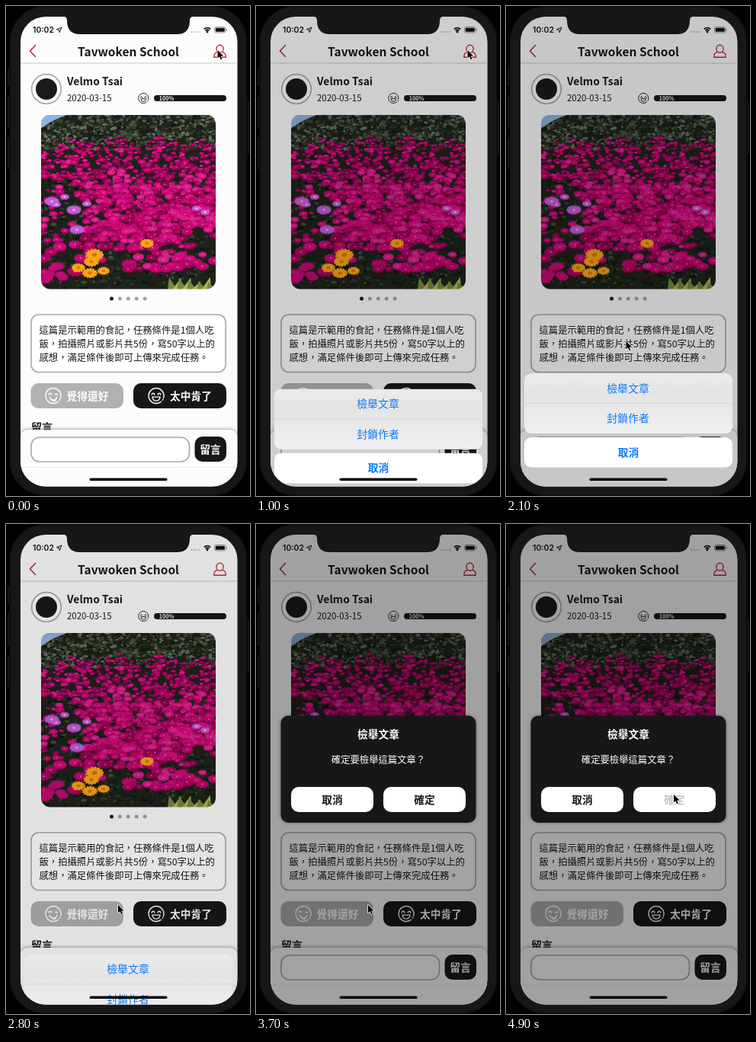
An HTML page with a canvas that plays this animation: 320 px wide and 643 px high, repeating every 5 s.

```html
<!DOCTYPE html>
<html lang="zh-Hant">
<head>
<meta charset="utf-8">
<title>Report dialog</title>
<style>
html, body { margin: 0; width: 100%; height: 100%; overflow: hidden; background: #000; }
canvas { display: block; width: 320px; height: 643px; }
</style>
</head>
<body>
<canvas id="stage"></canvas>
<script>
const W = 320, H = 643, LOOP = 5000, STEP = 100;
const INK = '#17171a', GREY = '#a9a9a9', RED = '#b3303a', BLUE = '#0a78f5';
const CJK = '"Noto Sans CJK TC", "Noto Sans CJK", "Noto Sans TC", "Noto Sans CJK JP", sans-serif';

const dpr = window.devicePixelRatio || 1;
const canvas = document.getElementById('stage');
const ctx = canvas.getContext('2d');
canvas.width = W * dpr;
canvas.height = H * dpr;

const clamp = v => Math.max(0, Math.min(1, v));
const span = (t, a, b) => clamp((t - a) / (b - a));
const smooth = u => u * u * (3 - 2 * u);
const easeOut = u => 1 - Math.pow(1 - u, 3);
const mix = (a, b, u) => a + (b - a) * u;

function rng(seed) {
  return () => (seed = (seed * 16807) % 2147483647) / 2147483647;
}

function roundPath(c, x, y, w, h, r) {
  c.beginPath();
  c.moveTo(x + r, y);
  c.arcTo(x + w, y, x + w, y + h, r);
  c.arcTo(x + w, y + h, x, y + h, r);
  c.arcTo(x, y + h, x, y, r);
  c.arcTo(x, y, x + w, y, r);
  c.closePath();
}

function box(x, y, w, h, r, fill, stroke, lw = 1.6) {
  roundPath(ctx, x, y, w, h, r);
  if (fill) { ctx.fillStyle = fill; ctx.fill(); }
  if (stroke) { ctx.strokeStyle = stroke; ctx.lineWidth = lw; ctx.stroke(); }
}

function disc(x, y, r, fill) {
  ctx.beginPath();
  ctx.arc(x, y, r, 0, 7);
  ctx.fillStyle = fill;
  ctx.fill();
}

function line(points, color, lw) {
  ctx.beginPath();
  points.forEach(([x, y], i) => i ? ctx.lineTo(x, y) : ctx.moveTo(x, y));
  ctx.strokeStyle = color;
  ctx.lineWidth = lw;
  ctx.stroke();
}

function arc(x, y, r, a, b, color, lw) {
  ctx.beginPath();
  ctx.arc(x, y, r, a, b);
  ctx.strokeStyle = color;
  ctx.lineWidth = lw;
  ctx.stroke();
}

// y is the optical middle of the line
function label(str, x, y, size, weight, color, align = 'center', family = CJK) {
  ctx.font = `${weight} ${size}px ${family}`;
  ctx.textAlign = align;
  ctx.fillStyle = color;
  ctx.fillText(str, x, y + size * 0.37);
}

// Flower bed in flat blobs, painted once
function paintPhoto() {
  const S = 229, k = Math.max(2, dpr);
  const off = document.createElement('canvas');
  off.width = off.height = S * k;
  const c = off.getContext('2d');
  const rand = rng(4177);
  const pick = list => list[Math.floor(rand() * list.length)];
  const blob = (x, y, rx, ry, color) => {
    c.beginPath();
    c.ellipse(x, y, rx, ry, rand() * 0.5 - 0.25, 0, 7);
    c.fillStyle = color;
    c.fill();
  };
  const flower = (x, y, r, n, color) => {
    c.strokeStyle = color;
    c.lineWidth = r * 0.24;
    for (let i = 0; i < n; i++) {
      const a = i * Math.PI * 2 / n;
      c.beginPath();
      c.moveTo(x, y);
      c.lineTo(x + Math.cos(a) * r, y + Math.sin(a) * r * 0.65);
      c.stroke();
    }
  };
  // Where the magenta carpet thins out into leaves
  const sparse = (x, y) => (x < 58 && y > 84) || y > 178 - Math.abs(x - 110) * 0.15 ||
                           (x > 180 && y > 148);
  c.scale(k, k);
  c.fillStyle = '#1d231b';
  c.fillRect(0, 0, S, S);

  for (let i = 0; i < 1100; i++) {
    const x = rand() * S, y = rand() * 46;
    blob(x, y, 1 + rand() * 2.4, 0.8 + rand() * 1.6, pick(['#39432f', '#4b5642', '#2a3326', '#687262', '#20271d', '#161c14']));
  }
  c.beginPath();
  c.moveTo(0, 0);
  c.lineTo(36, 0);
  c.quadraticCurveTo(16, 6, 0, 18);
  c.fillStyle = '#8fb4e0';
  c.fill();

  for (let i = 0; i < 800; i++) {
    blob(rand() * S, 80 + rand() * 149, 1 + rand() * 3, 0.8 + rand() * 1.5, pick(['#2c3828', '#161d18', '#414c36', '#0f150f']));
  }

  const N = 1500;
  for (let i = 0; i < N; i++) {
    const u = i / N, x = rand() * S;
    const top = 36 - 7 * Math.sin(x / S * Math.PI) + 4 * Math.sin(x * 0.11);
    const y = mix(top, 204, u) + rand() * 6;
    if (sparse(x, y) && rand() < 0.86) continue;
    const r = mix(3.2, 7.6, u) * (0.6 + rand() * 0.6);
    const color = pick(['#c4066f', '#d40b80', '#b00463', '#e01e90', '#94044f', '#c80873']);
    blob(x + 1, y + r * 0.5, r, r * 0.45, pick(['#4c0a30', '#2b1a20', '#6d0640']));
    blob(x, y, r * 0.85, r * 0.48, color);
    if (r > 4.4) {
      flower(x, y, r * 1.15, 13, color);
      blob(x, y, r * 0.17, r * 0.12, '#f0709c');
    }
  }
  for (let i = 0; i < 8; i++) flower(4 + rand() * 26, 186 + rand() * 32, 6 + rand() * 3, 15, '#c20b75');

  [[14, 114], [43, 125], [47, 151], [20, 118], [31, 108], [215, 128], [204, 123], [60, 117]].forEach(([x, y], i) => {
    const r = i < 3 ? 9.5 : 6;
    blob(x, y, r * 0.7, r * 0.4, '#a839c8');
    flower(x, y, r, 15, '#c65ce0');
    blob(x, y, 1.8, 1.2, '#e6c9a0');
  });
  [[70, 184, 12], [49, 201, 9], [64, 208, 10], [82, 205, 8], [66, 193, 10], [139, 169, 9]].forEach(([x, y, r]) => {
    blob(x, y, r * 0.75, r * 0.6, '#ef9209');
    flower(x, y, r, 13, '#fba818');
    blob(x, y, r * 0.3, r * 0.22, '#d9780a');
  });
  for (let i = 0; i < 10; i++) {
    const x = 172 + i * 6.4, h = 9 + rand() * 7;
    c.beginPath();
    c.moveTo(x - 6, S);
    c.lineTo(x + (i % 2 ? 5 : -4), S - h);
    c.lineTo(x + 6, S);
    c.fillStyle = i % 2 ? '#a9b653' : '#75883d';
    c.fill();
  }
  return off;
}
const photo = paintPhoto();

function face(x, y, r, color, wink) {
  const lw = r * 0.14;
  ctx.lineCap = 'round';
  arc(x, y, r, 0.9, 6.6, color, lw);
  arc(x, y, r, 0.5, 0.6, color, lw);
  arc(x - r * 0.4, y - r * 0.14, r * 0.18, Math.PI, 0, color, lw);
  if (wink) {
    line([[x + r * 0.22, y - r * 0.2], [x + r * 0.58, y - r * 0.2]], color, lw);
    arc(x, y + r * 0.08, r * 0.48, 0.2, Math.PI - 0.2, color, lw);
    arc(x + r * 0.1, y + r * 0.5, r * 0.2, 0, Math.PI, color, lw);
  } else {
    arc(x + r * 0.4, y - r * 0.14, r * 0.18, Math.PI, 0, color, lw);
    ctx.beginPath();
    ctx.arc(x, y + r * 0.16, r * 0.5, 0, Math.PI);
    ctx.closePath();
    ctx.stroke();
  }
  ctx.lineCap = 'butt';
}

function personIcon(alpha) {
  ctx.save();
  ctx.globalAlpha = alpha;
  ctx.lineJoin = ctx.lineCap = 'round';
  ctx.strokeStyle = RED;
  ctx.lineWidth = 1.4;
  ctx.beginPath();
  ctx.ellipse(280.5, 56.3, 4.6, 5, 0, 0, 7);
  ctx.moveTo(277, 60.3);
  ctx.bezierCurveTo(274, 61.8, 272.7, 62.5, 272.7, 67.2);
  ctx.lineTo(288.3, 67.2);
  ctx.bezierCurveTo(288.3, 62.5, 287, 61.8, 284, 60.3);
  ctx.stroke();
  ctx.restore();
}

function statusBar() {
  label('10:02', 35, 31.5, 10.4, 600, '#111', 'left', 'Inter, "Liberation Sans", sans-serif');
  ctx.beginPath();
  ctx.moveTo(73, 28);
  ctx.lineTo(70.2, 34.7);
  ctx.lineTo(69.7, 31.3);
  ctx.lineTo(66.4, 30.8);
  ctx.closePath();
  ctx.strokeStyle = '#111';
  ctx.lineWidth = 1;
  ctx.stroke();
  for (let i = 0; i < 4; i++) disc(243.5 + i * 3.5, 34, 1, '#b5b5b5');
  for (const r of [3.6, 6.3]) arc(264, 35, r, -2.3, -0.84, '#111', 1.7);
  disc(264, 34, 1.4, '#111');
  box(273.5, 27.5, 14.5, 7.5, 2.2, null, '#777', 0.8);
  box(274.7, 28.7, 12.1, 5.1, 1.2, '#111');
  box(288.8, 30, 1, 2.6, 0.5, '#777');
}

function page(iconAlpha) {
  ctx.fillStyle = '#fdfcfd';
  ctx.fillRect(18, 13, 286, 618);
  statusBar();

  ctx.lineCap = 'round';
  line([[38.5, 51.5], [31.5, 59], [38.5, 66.5]], RED, 1.6);
  ctx.lineCap = 'butt';
  label('Tavwoken School', 160.5, 60, 15.5, 'bold', INK);
  personIcon(iconAlpha);
  line([[18, 75], [304, 75]], '#c9c9c9', 1);

  disc(53, 109, 19.5, '#fff');
  disc(53, 109, 14, '#1a1a1a');
  arc(53, 109, 19.3, 0, 7, GREY, 1.7);
  label('Velmo Tsai', 80, 99, 13.9, 'bold', INK, 'left');
  label('2020-03-15', 80, 121, 11.4, 500, INK, 'left');
  face(180.3, 121, 6.6, INK, false);
  box(194, 117, 95, 8, 4, INK);
  label('100%', 210.5, 121, 7.2, 'bold', '#fff');

  ctx.save();
  roundPath(ctx, 46, 142.5, 229, 229, 12);
  ctx.clip();
  ctx.drawImage(photo, 46, 142.5, 229, 229);
  ctx.restore();
  for (let i = 0; i < 5; i++) disc(138.5 + i * 10.9, 384, 2.5, i ? '#a6a6a6' : INK);

  box(33, 405, 255, 75.5, 10, '#fff', GREY);
  ['這篇是示範用的食記，任務條件是1個人吃',
   '飯，拍攝照片或影片共5份，寫50字以上的',
   '感想，滿足條件後即可上傳來完成任務。'
  ].forEach((s, i) => label(s, 43.5, 425 + i * 18, 12.35, 500, INK, 'left'));

  box(32.5, 495, 121.5, 33, 10, '#b1b1b0');
  box(167, 495, 122, 33, 10, INK);
  face(62, 511.5, 10, '#fff', true);
  face(197, 511.5, 10, '#fff', false);
  label('覺得還好', 107, 511.5, 13.7, 'bold', '#fff');
  label('太中肯了', 242.5, 511.5, 13.7, 'bold', '#fff');
  label('留言', 33, 552.5, 14, 'bold', INK, 'left');

  ctx.save();
  ctx.shadowColor = 'rgba(0,0,0,.5)';
  ctx.shadowBlur = 5 * dpr;
  box(18.5, 556, 285, 90, 10, '#fdfcfd');
  ctx.restore();
  line([[18, 605.5], [304, 605.5]], '#ededed', 1);
  box(33, 566, 207.5, 32, 11, '#fff', GREY);
  box(247.5, 565, 41.5, 33, 10, INK);
  label('留言', 268, 582, 13.7, 'bold', '#fff');
}

function dim(alpha) {
  ctx.fillStyle = `rgba(0,0,0,${alpha})`;
  ctx.fillRect(18, 13, 286, 618);
}

function sheet(p, pressed) {
  if (p <= 0) return;
  dim(0.21 * p);
  ctx.save();
  ctx.translate(0, (1 - p) * 165);
  const g = ctx.createLinearGradient(0, 482, 0, 561);
  g.addColorStop(0, '#ebebec');
  g.addColorStop(0.35, '#e4e4e5');
  g.addColorStop(1, '#f0f0f0');
  box(24, 482, 273, 79, 9, g);
  if (pressed) {
    ctx.save();
    ctx.clip();
    ctx.fillStyle = 'rgba(0,0,0,.08)';
    ctx.fillRect(24, 482, 273, 39);
    ctx.restore();
  }
  line([[24, 521.3], [297, 521.3]], '#cdcdcf', 0.7);
  box(24, 566, 273, 39.5, 9, '#fff');
  label('檢舉文章', 160, 501.5, 13.9, 500, BLUE);
  label('封鎖作者', 160, 541, 13.9, 500, BLUE);
  label('取消', 160.5, 585.5, 13.7, 'bold', BLUE);
  ctx.restore();
}

function dialog(p, pressed) {
  if (p <= 0) return;
  dim(0.36 * smooth(p));
  const s = 0.58 + 0.42 * p;
  ctx.save();
  ctx.globalAlpha = Math.min(1, p * 2);
  ctx.translate(160.5, 321.5);
  ctx.scale(s, s);
  ctx.translate(-160.5, -321.5);
  ctx.save();
  ctx.shadowColor = 'rgba(0,0,0,.35)';
  ctx.shadowBlur = 5 * dpr;
  box(32.5, 251.5, 256, 140.5, 10, INK);
  ctx.restore();
  label('檢舉文章', 160.5, 275.5, 13.7, 'bold', '#fff');
  label('確定要檢舉這篇文章？', 160.5, 309, 12.35, 'normal', '#fff');
  box(46, 345, 108, 33, 10, '#fff');
  box(167, 345, 108, 33, 10, '#fff');
  label('取消', 100, 362, 13.7, 'bold', INK);
  label('確定', 221, 362, 13.7, 'bold', pressed ? '#c4c4c4' : INK);
  ctx.restore();
}

function bezel() {
  ctx.fillStyle = '#000';
  ctx.fillRect(0, 0, W, H);
  for (const [x, y, h] of [[2, 82, 23], [2, 117, 43], [2, 172, 42], [315, 125, 69]]) box(x, y, 4, h, 1, '#151517');
  box(5, 0.5, 311, 642, 46, INK, '#0b0b0c', 1.5);
}

function notch() {
  ctx.beginPath();
  ctx.moveTo(74, 13);
  ctx.quadraticCurveTo(80, 14, 80, 19);
  ctx.quadraticCurveTo(80, 37, 97, 37);
  ctx.lineTo(224, 37);
  ctx.quadraticCurveTo(241, 37, 241, 19);
  ctx.quadraticCurveTo(241, 14, 247, 13);
  ctx.closePath();
  ctx.fillStyle = INK;
  ctx.fill();
}

const path = [[0, 277, 58], [1700, 277, 58], [2100, 157, 440], [2400, 146.5, 500],
              [3800, 146.5, 500], [4300, 219.5, 355], [5000, 219.5, 355]];

function cursorAt(t) {
  const i = path.findIndex((k, n) => n && t < k[0]);
  const [t0, x0, y0] = path[i - 1], [t1, x1, y1] = path[i];
  const u = smooth(span(t, t0, t1));
  return [mix(x0, x1, u), mix(y0, y1, u)];
}

function pointer([x, y], ring) {
  if (ring) arc(x, y - 0.5, 16.8, 0, 7, '#111', 1.4);
  ctx.save();
  ctx.translate(x + 0.5, y);
  ctx.scale(0.92, 0.92);
  ctx.beginPath();
  ctx.moveTo(0, 0);
  for (const [px, py] of [[0, 11.5], [2.7, 9], [4.6, 13.3], [6.5, 12.5], [4.6, 8.3], [8.2, 8.1]]) ctx.lineTo(px, py);
  ctx.closePath();
  ctx.lineJoin = 'round';
  ctx.strokeStyle = '#fff';
  ctx.lineWidth = 1.5;
  ctx.stroke();
  ctx.fillStyle = '#000';
  ctx.fill();
  ctx.restore();
}

function draw(t) {
  const within = (a, b) => t >= a && t < b;
  const iconPress = within(700, 900), rowPress = within(2500, 2700);
  const sheetIn = easeOut(span(t, 750, 1250));
  const sheetOut = smooth(span(t, 2600, 3000));

  ctx.setTransform(dpr, 0, 0, dpr, 0, 0);
  bezel();
  ctx.save();
  roundPath(ctx, 19, 14, 284.5, 616.5, 33);
  ctx.clip();
  page(iconPress ? 0.22 : 1);
  sheet(sheetIn * (1 - sheetOut), rowPress);
  dialog(span(t, 3150, 3500), t >= 4900);
  box(109.5, 619.5, 102, 3.6, 1.8, '#050505');
  notch();
  ctx.restore();
  pointer(cursorAt(t), iconPress || rowPress);
}

const start = performance.now();
function tick() {
  const t = (performance.now() - start) % LOOP;
  draw(Math.floor(t / STEP) * STEP);
  requestAnimationFrame(tick);
}
tick();
</script>
</body>
</html>
```
